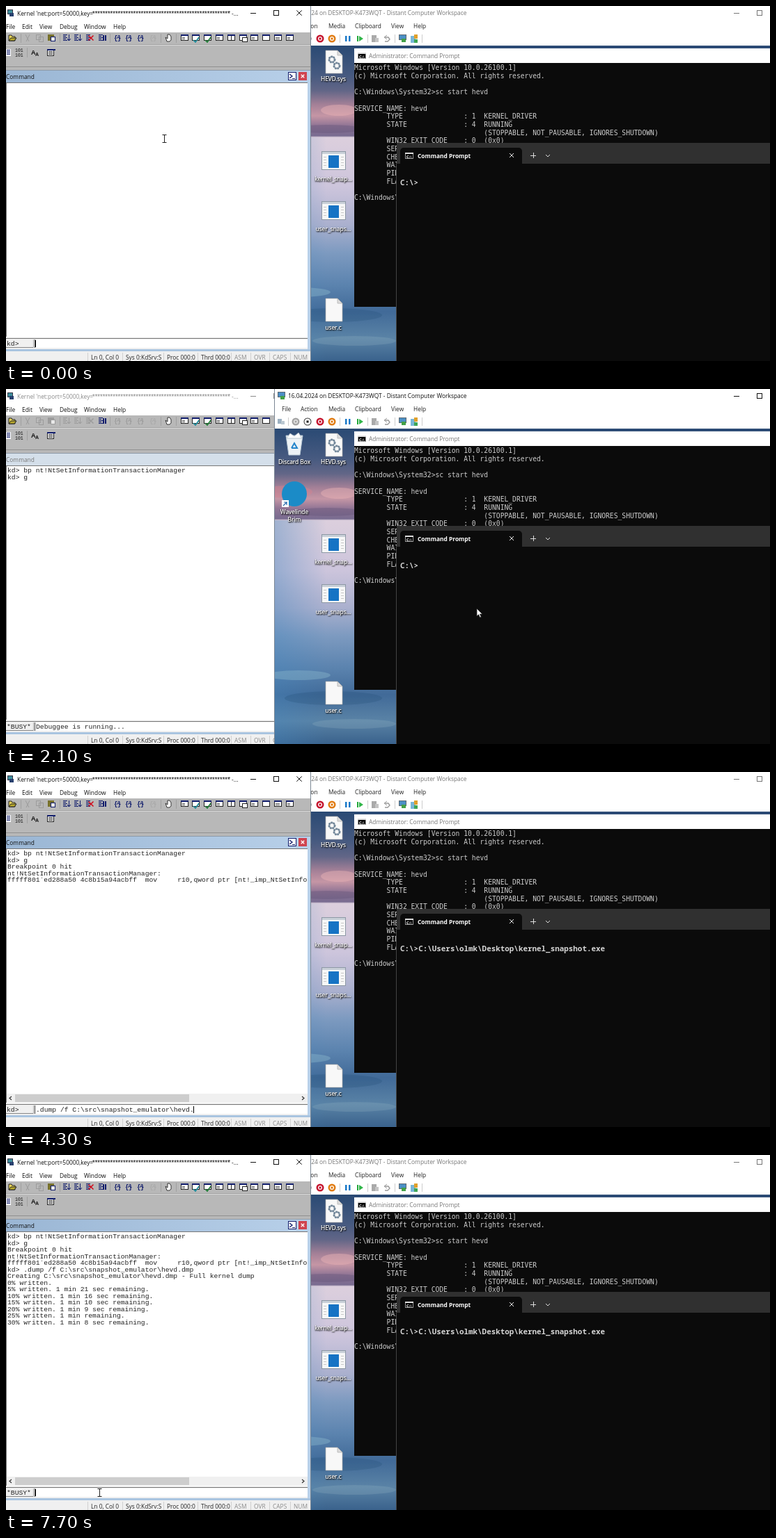
Animation of 1097x511 px, one loop 8 s. Source, as an HTML page with a canvas:

```html
<!DOCTYPE html>
<html lang="en">
<head>
<meta charset="utf-8">
<title>Kernel debugging session</title>
<style>
html, body { margin: 0; width: 100%; height: 100%; overflow: hidden; background: #fff; }
canvas { display: block; }
</style>
</head>
<body>
<canvas id="stage" width="1097" height="511"></canvas>
<script>
const ctx = document.getElementById('stage').getContext('2d');
const LOOP = 8000, STEP = 100;
const UI = '8.4px "Open Sans", sans-serif';
const KD = '9.7px "Liberation Mono", monospace';
const CONSOLE = '9.68px "DejaVu Sans Mono", monospace';
const SHELL = '600 10.9px "Noto Sans Mono", monospace';
const NAVY = '#101c6c', GREY = '#9c9c9c', CHAR = 5.82;

const BREAK = 'bp nt!NtSetInformationTransactionManager';
const DUMP = '.dump /f C:\\src\\snapshot_emulator\\hevd.dmp';
const LOG = [
  [1500, 'kd> ' + BREAK],
  [1700, 'kd> g'],
  [2400, 'Breakpoint 0 hit'],
  [2400, 'nt!NtSetInformationTransactionManager:'],
  [2400, 'fffff801`ed288a50 4c8b15a94acbff  mov     r10,qword ptr [nt!_imp_NtSetInformationTransactionManager'],
  [4400, 'kd> ' + DUMP],
  [4400, 'Creating C:\\src\\snapshot_emulator\\hevd.dmp - Full kernel dump'],
  [4400, '0% written.'],
  [5000, '5% written. 1 min 21 sec remaining.'],
  [5500, '10% written. 1 min 16 sec remaining.'],
  [6000, '15% written. 1 min 10 sec remaining.'],
  [6600, '20% written. 1 min 9 sec remaining.'],
  [7100, '25% written. 1 min remaining.'],
  [7700, '30% written. 1 min 8 sec remaining.'],
];
const field = (name, value) => ' '.repeat(8) + name.padEnd(19) + ': ' + value;
const SERVICE = [
  'Microsoft Windows [Version 10.0.26100.1]',
  '(c) Microsoft Corporation. All rights reserved.', '',
  'C:\\Windows\\System32>sc start hevd', '',
  'SERVICE_NAME: hevd',
  field('TYPE', '1  KERNEL_DRIVER'),
  field('STATE', '4  RUNNING'),
  ' '.repeat(32) + '(STOPPABLE, NOT_PAUSABLE, IGNORES_SHUTDOWN)',
  field('WIN32_EXIT_CODE', '0  (0x0)'),
  field('SERVICE_EXIT_CODE', '0  (0x0)'),
  field('CHECKPOINT', '0x0'), field('WAIT_HINT', '0x0'),
  field('PID', '0'), field('FLAGS', ''), '',
  'C:\\Windows\\System32>',
];

function rect(color, x, y, w, h) {
  ctx.fillStyle = color;
  ctx.fillRect(x, y, w, h);
}
function frame(color, x, y, w, h) {
  ctx.strokeStyle = color;
  ctx.lineWidth = 1;
  ctx.strokeRect(x + .5, y + .5, w - 1, h - 1);
}
function text(str, x, y, color = '#111', font = UI) {
  ctx.fillStyle = color;
  ctx.font = font;
  ctx.fillText(str, x, y);
}
function path(points, stroke, width = 1, fill) {
  ctx.beginPath();
  for (let i = 0; i < points.length; i += 2) ctx.lineTo(points[i], points[i + 1]);
  if (fill) { ctx.closePath(); ctx.fillStyle = fill; ctx.fill(); }
  if (stroke) { ctx.strokeStyle = stroke; ctx.lineWidth = width; ctx.stroke(); }
}
function ellipse(color, x, y, rx, ry = rx) {
  ctx.beginPath();
  ctx.ellipse(x, y, rx, ry, 0, 0, 7);
  ctx.fillStyle = color;
  ctx.fill();
}
function cross(x, y, r, color, width = 1) {
  path([x - r, y - r, x + r, y + r], color, width);
  path([x + r, y - r, x - r, y + r], color, width);
}
function gradient(x0, y0, x1, y1, stops) {
  const g = ctx.createLinearGradient(x0, y0, x1, y1);
  stops.forEach(([at, color]) => g.addColorStop(at, color));
  return g;
}
function clipped(x, y, w, h, draw) {
  ctx.save();
  ctx.beginPath();
  ctx.rect(x, y, w, h);
  ctx.clip();
  draw();
  ctx.restore();
}
function label(str, x, y) {
  ctx.save();
  ctx.textAlign = 'center';
  ctx.shadowColor = '#000';
  ctx.shadowBlur = 2;
  ctx.shadowOffsetX = ctx.shadowOffsetY = .7;
  text(str, x, y, '#fff');
  text(str, x, y, '#fff');
  ctx.restore();
}
function consoleIcon(x, y) {
  rect('#000', x - 6, y - 5, 12, 9);
  frame('#999', x - 6, y - 5, 12, 9);
  rect('#ddd', x - 6, y - 5, 12, 2);
  text('C:\\', x - 4, y + 3, '#fff', 'bold 5px "DejaVu Sans", sans-serif');
}
function windowButtons(x, gap, color, closable) {
  path([x - 4, 10.5, x + 4, 10.5], color);
  frame(color, x + gap - 4, 6, 8, 8);
  if (closable) cross(x + 2 * gap, 10, 3.7, color);
}

function wallpaper() {
  const sky = [
    [57, '#2a4a74'], [100, '#475a80'], [122, '#626687'], [142, '#a48097'], [158, '#c596a5'],
    [172, '#917595'], [187, '#786b90'], [189, '#dccfdd'], [260, '#cdc5dc'], [315, '#aab0ce'],
    [355, '#7d9ac0'], [400, '#5c84af'], [440, '#416a98'], [478, '#5a83a6'], [511, '#3a628c'],
  ];
  rect(gradient(0, 57, 0, 511, sky.map(([y, color]) => [(y - 57) / 454, color])), 386, 57, 711, 454);
  rect(gradient(386, 0, 460, 0, [[0, 'rgba(70,135,190,.4)'], [1, 'rgba(70,135,190,0)']]), 386, 189, 74, 322);
  clipped(386, 57, 175, 454, () => {
    ellipse('rgba(214,130,142,.45)', 404, 148, 36, 9);
    ellipse('rgba(235,180,182,.45)', 478, 150, 26, 8);
    ellipse('rgba(92,78,114,.35)', 462, 177, 50, 6);
    ellipse('rgba(140,184,204,.4)', 420, 412, 46, 7);
    ellipse('rgba(35,75,116,.25)', 470, 445, 70, 10);
    ellipse('rgba(137,169,188,.3)', 500, 482, 60, 7);
  });
}
function filePage(x, y) {
  path([x, y, x + 17, y, x + 24, y + 7, x + 24, y + 33, x, y + 33], '#aaa', .7, '#f8f8f8');
  path([x + 17, y, x + 17, y + 7, x + 24, y + 7], '#aaa', .7, '#ddd');
}
function gear(x, y, r) {
  ctx.setLineDash([2, 1.4]);
  ctx.beginPath();
  ctx.arc(x, y, r, 0, 7);
  ctx.strokeStyle = '#718699';
  ctx.lineWidth = 3;
  ctx.stroke();
  ctx.setLineDash([]);
  ctx.lineWidth = 1.5;
  ctx.stroke();
}
function programIcon(y) {
  rect('#f7f7f7', 453, y, 35, 27);
  frame('#8d98a5', 453, y, 35, 27);
  rect('#c9d0d8', 454, y + 1, 33, 3);
  rect('#1673c4', 463, y + 6, 15, 18);
  for (const x of [456, 481]) for (let i = 0; i < 4; i++) rect('#c6c6c6', x, y + 8 + i * 4, 4, 1);
}
function desktop() {
  wallpaper();
  path([402, 67, 426, 67, 422, 95, 406, 95], '#b9c8d4', 1, '#eef3f6');
  path([403, 71, 408, 64, 414, 68, 420, 63, 425, 71], '#bcc8d0', 1, '#fff');
  path([410, 85, 414, 78, 418, 85, 410, 85], '#2585cb', 2);
  label('Discard Box', 414, 108);
  ellipse('#1b8bc7', 414, 151, 18);
  rect('#fff', 396, 160, 10, 10);
  path([398, 168, 403, 163, 399, 163, 403, 163, 403, 167], '#2468ad', 1.2);
  label('Wavelinde', 414, 180);
  label('Brim', 414, 191);
  filePage(459, 64);
  gear(468, 77, 4);
  gear(475, 86, 4);
  label('HEVD.sys', 470, 108);
  programIcon(209);
  label('kernel_snap...', 470, 252);
  programIcon(281);
  label('user_snaps...', 470, 324);
  filePage(459, 421);
  label('user.c', 470, 466);
}
function consoles(t) {
  rect('#fff', 500, 61, 597, 22);
  consoleIcon(511, 72);
  text('Administrator: Command Prompt', 521, 74.5, '#777');
  rect('#0b0b0b', 500, 82, 597, 351);
  SERVICE.forEach((row, i) => text(row, 500, 92.4 + i * 11.65, '#ccc', CONSOLE));

  rect('#0b0b0b', 561, 197, 536, 314);
  rect('#303030', 561, 197, 536, 30);
  rect('#444', 560, 227, 1, 284);
  ctx.beginPath();
  ctx.roundRect(566, 204, 175, 24, [5, 5, 0, 0]);
  ctx.fillStyle = '#0b0b0b';
  ctx.fill();
  consoleIcon(579, 216);
  text('Command Prompt', 591, 219, '#fff', 'bold 8.4px "Open Sans", sans-serif');
  cross(726, 215, 3, '#eee');
  path([753, 215.5, 761, 215.5], '#ddd');
  path([757.5, 211, 757.5, 219], '#ddd');
  path([775, 214, 778, 217, 781, 214], '#ddd');
  const command = t < 2300 ? '' : 'C:\\Users\\olmk\\Desktop\\kernel_snapshot.exe';
  text('C:\\>' + command, 566, 257.6, '#d6d6d6', SHELL);
}
function monitorIcon(x, y) {
  rect('#4b8fc5', x - 5, y - 5, 11, 8);
  frame('#5c6973', x - 5, y - 5, 11, 8);
  rect('#43a047', x - 1, y + 1, 6, 5);
}
function guestWindow(t, active) {
  rect('#fff', 386, 0, 711, 57);
  const ink = active ? '#111' : '#777';
  monitorIcon(395, 9);
  text('16.04.2024 on DESKTOP-K473WQT - Distant Computer Workspace', 405, 12.5, ink);
  windowButtons(1049, 33, ink);
  [['File', 396], ['Action', 423], ['Media', 463], ['Clipboard', 501], ['View', 553], ['Help', 585]]
    .forEach(([name, x]) => text(name, x, 31.5, '#222'));
  for (const x of [405, 479, 519, 558, 597]) rect('#ccc', x, 41, 1, 12);
  rect('#9db1c2', 390, 43, 6, 7);
  rect('#bbc8d2', 395, 46, 5, 5);
  [[416, '#a5a5a5', '#eee'], [433, '#333', '#fff'], [451, '#c4122c', '#fff'], [468, '#e07a10', '#fff']]
    .forEach(([x, outer, inner]) => {
      ellipse(outer, x, 47, 5.5);
      ellipse(inner, x, 47, x === 433 ? 4.5 : 3);
      rect(x === 433 ? '#111' : outer, x - 1.5, 45.5, 3, 3);
    });
  rect('#1878c8', 487, 43, 2.5, 8);
  rect('#1878c8', 492, 43, 2.5, 8);
  rect('#23a73a', 504, 43, 2, 8);
  path([507, 43, 513, 47, 507, 51], null, 0, '#32b64a');
  rect('#aaa', 525, 42, 7, 10);
  rect('#c4c4c4', 530, 46, 5, 6);
  path([544, 45, 549, 45, 551, 48, 548, 51, 544, 51], '#999', 1.4);
  path([547, 42, 543, 45, 547, 48], '#999');
  monitorIcon(569, 46);
  rect('#78b6d8', 581, 43, 7, 10);
  rect('#e0a02b', 586, 41, 5, 6);
  rect('#3da655', 586, 48, 5, 5);
  desktop();
  consoles(t);
}

function codeIcon(x, ink, mark) {
  for (let i = 0; i < 5; i++) rect(ink, x - 5, 41 + i * 2, i % 2 ? 4 : 6, 1);
  if (mark === 'x') cross(x + 2, 46, 3.5, ink === GREY ? GREY : '#d01020', 1.6);
  else if (mark === 'pause') { rect(NAVY, x + 1, 42, 2, 8); rect(NAVY, x + 4, 42, 2, 8); }
  else path([x + 3.5, 41, x + 3.5, 50, x + 1, 47, x + 3.5, 50, x + 6, 47], ink);
}
function toolbar(busy) {
  const ink = busy ? GREY : NAVY;
  rect('#b8b8b8', 0, 38, 437, 55);
  rect('#dadada', 0, 56, 437, 1);
  rect('#a2a2a2', 0, 55, 437, 1);
  rect('#909090', 0, 87, 437, 1);
  for (const x of [21, 77, 149, 222, 244]) rect('#a0a0a0', x, 40, 1, 13);
  path([4, 50, 4, 42, 8, 42, 9, 44, 13, 44, 13, 50], '#222', 1, '#e9d45a');
  path([4, 50, 7, 46, 15, 46, 12, 50], '#222', 1, '#b9a92c');
  path([28, 41, 33, 51], GREY);
  path([34, 41, 29, 51], GREY);
  frame(GREY, 43, 41, 7, 8);
  frame(GREY, 47, 44, 7, 8);
  rect(busy ? GREY : '#77712c', 60, 41, 9, 9);
  rect('#e8e8e8', 64, 44, 7, 7);
  frame(ink, 64, 44, 7, 7);
  codeIcon(87, ink);
  codeIcon(103, ink);
  codeIcon(120, ink, 'x');
  codeIcon(138, NAVY, 'pause');
  for (const x of [160, 176, 193, 211]) {
    const color = x === 211 ? '#aaa' : ink;
    text('{', x - 5, 49, color, 'bold 9px "Liberation Mono", monospace');
    text('}', x, 49, color, 'bold 9px "Liberation Mono", monospace');
    path([x - 1, 47, x + 1, 44, x + 3, 47], color);
  }
  path([229, 45, 232, 47, 232, 41, 235, 41, 237, 44, 237, 49, 235, 51, 231, 51], '#333', 1, '#fff');
  for (let i = 0; i < 10; i++) {
    const x = Math.round(250.5 + i * 16.8);
    rect('#fff', x, 41, 11, 9);
    frame('#222', x, 41, 11, 9);
    rect(NAVY, x, 41, 11, 2);
    if (i === 1 || i === 2) path([x + 2, 49, x + 5, 52, x + 10, 45], i === 1 ? '#168a9a' : '#187b30', 1.6);
    else if (i === 4) rect('#222', x + 5, 43, 1, 6);
    else if (i === 5) { rect('#fff', x + 4, 45, 8, 7); frame('#222', x + 4, 45, 8, 7); }
    else if (i !== 7) for (let k = 0; k < 2; k++) rect('#555', x + 2, 45 + k * 2, i % 3 ? 6 : 4, 1);
  }
  rect('#fff', 0, 62, 7, 10);
  for (let i = 0; i < 4; i++) rect(NAVY, 1, 63 + i * 2, 5, 1);
  text('101', 13, 66, '#111', '6.5px "Liberation Mono", monospace');
  text('101', 13, 73, '#111', '6.5px "Liberation Mono", monospace');
  rect('#a0a0a0', 30, 60, 1, 14);
  text('A', 36, 70, '#111', 'bold 9px "Liberation Sans", sans-serif');
  text('A', 42, 72, '#111', 'bold 7px "Liberation Sans", sans-serif');
  rect('#fff', 59, 62, 10, 10);
  frame('#222', 59, 62, 10, 10);
  rect(NAVY, 59, 62, 12, 2);
  for (let i = 0; i < 3; i++) rect('#333', 61, 65 + i * 2, 6, 1);
}
function inputLine(t, busy) {
  rect('#f0f0f0', 0, 477, 433, 17);
  rect('#fff', 41, 480, 392, 12);
  rect('#777', 0, 478, 433, 1);
  rect('#444', 41, 480, 1, 12);
  rect('#888', 0, 491, 40, 1);
  rect('#aaa', 39, 480, 1, 12);
  text(busy ? '*BUSY*' : 'kd>', 1, 488.5, '#222', KD);
  let typed = '';
  if (t < 1500) typed = BREAK.slice(0, Math.max(0, Math.round((t - 200) / 30)));
  else if (t === 1600) typed = 'g';
  else if (t >= 2800 && t < 4400) typed = DUMP.slice(0, Math.round(6 + (t - 2900) * .0236));
  const running = t >= 1700 && t < 2400;
  text(running ? 'Debuggee is running...' : typed, 43, 488.5, '#222', KD);
  const blinkedOff = t >= 4400 && t < 4600 || t >= 4800 && t < 5100;
  const focused = t < 1700 || t >= 2700;
  if (focused && !blinkedOff) rect('#000', Math.round(42 + typed.length * CHAR), 481, 1, 10);
}
function statusBar() {
  rect('#f0f0f0', 0, 497, 438, 14);
  [['Ln 0, Col 0', 122], ['Sys 0:KdSrv:S', 172], ['Proc 000:0', 231], ['Thrd 000:0', 280],
   ['ASM', 328], ['OVR', 356], ['CAPS', 383], ['NUM', 413]].forEach(([name, x]) => {
    rect('#d0d0d0', x - 5, 499, 1, 12);
    text(name, x, 509.3, x > 320 ? '#8a8a8a' : '#222');
  });
}
function debuggerWindow(t, active) {
  const running = t >= 1700 && t < 2400;
  const ink = active ? '#111' : '#8a8a8a';
  rect('#fff', 0, 0, 438, 511);
  rect('#3f8f9c', 2, 5, 8, 7);
  frame('#334', 2, 5, 8, 7);
  rect('#28406e', 5, 10, 6, 5);
  text("Kernel 'net:port=50000,key=", 16, 13.5, ink);
  text('*'.repeat(54), 124, 13.5, ink, '8.5px Roboto, sans-serif');
  text("' -...", 320, 13.5, ink);
  windowButtons(355, 33, ink, true);
  [['File', 0], ['Edit', 23], ['View', 48], ['Debug', 77], ['Window', 112], ['Help', 154]]
    .forEach(([name, x]) => text(name, x, 32.5, '#111'));
  toolbar(running);

  rect(active ? '#b9d1ea' : '#d7e4f2', 433, 93, 4, 404);
  rect(active ? gradient(0, 0, 433, 0, [[0, '#9ab6d4'], [1, '#b8d0e9']]) : '#d4dfea', 0, 93, 433, 17);
  rect('#8d9aa8', 0, 92, 437, 1);
  text('Command', 0, 104.5, active ? '#111' : '#777');
  rect('#fff', 405, 95, 12, 12);
  frame(NAVY, 405, 95, 12, 12);
  path([407, 98, 411, 101, 407, 104], NAVY, 1.3);
  rect(NAVY, 411, 104, 4, 1);
  rect('#d04450', 420, 95, 12, 12);
  cross(426, 101, 2.2, '#fff', 1.3);
  rect('#777', 0, 110, 433, 1);
  rect('#777', 0, 110, 1, 366);

  clipped(0, 111, 433, 364, () => {
    LOG.filter(([at]) => t >= at).forEach(([, line], i) => text(line, 2, 120 + i * 9.5, '#222', KD));
  });
  if (t >= 2400) {
    rect('#f0f0f0', 1, 463, 432, 13);
    rect('#cdcdcd', 13, 464, 250, 11);
    path([8, 467, 5, 469.5, 8, 472], '#333', 1.2);
    path([425, 467, 428, 469.5, 425, 472], '#333', 1.2);
  }
  inputLine(t, running || t >= 4400);
  rect('#a9c4e0', 0, 494, 437, 3);
  statusBar();
  rect('#7b8794', 437, 0, 1, 511);
}

function ibeam(x, y) {
  path([x - 2.5, y - 5.5, x + 3.5, y - 5.5], '#222');
  path([x + .5, y - 5, x + .5, y + 5], '#222');
  path([x - 2.5, y + 5.5, x + 3.5, y + 5.5], '#222');
}
function arrow(x, y) {
  path([x, y, x, y + 11, x + 2.6, y + 8.7, x + 4.5, y + 13, x + 6.3, y + 12.2, x + 4.5, y + 8, x + 8, y + 8, x, y],
    '#222', .8, '#fff');
}
function pointer(t) {
  if (t < 300) ibeam(227, 191);
  else if (t === 1800) ibeam(330, 250);
  else if (t === 1900) arrow(610, 308);
  else if (t >= 2000 && t < 2500) arrow(676, 316);
  else if (t === 2500) arrow(430, 360);
  else if (t === 2600) ibeam(152, 411);
  else if (t === 2700 || t >= 4400) ibeam(134, 486);
}

function render(t) {
  const guestActive = t >= 2100 && t < 2700;
  if (guestActive) {
    debuggerWindow(t, false);
    guestWindow(t, true);
    rect('#7b8794', 385, 0, 1, 511);
  } else {
    guestWindow(t, false);
    debuggerWindow(t, true);
  }
  pointer(t);
}

let shown = -1;
const start = performance.now();
function tick() {
  const t = Math.floor(((performance.now() - start) % LOOP) / STEP) * STEP;
  if (t !== shown) render(shown = t);
  requestAnimationFrame(tick);
}
tick();
</script>
</body>
</html>
```
